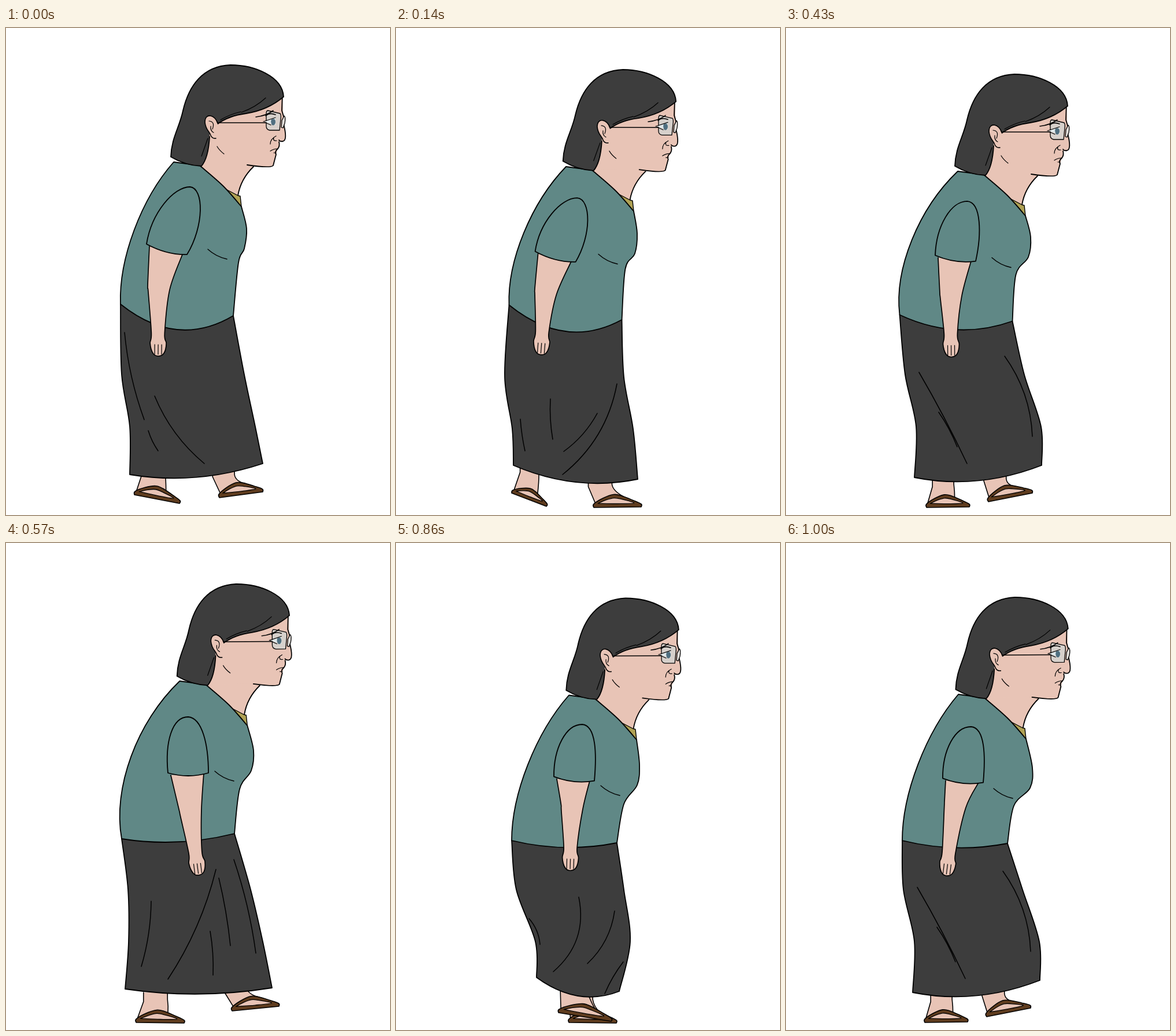
Animation, 664 px wide and 843 px high, one loop 1140 ms. Source, as an HTML page with a canvas:

```html
<!DOCTYPE html>
<html lang="en">
<head>
<meta charset="utf-8">
<title>Walk cycle</title>
<style>
html, body { margin: 0; width: 100%; height: 100%; overflow: hidden; background: #fff; }
canvas { display: block; }
</style>
</head>
<body>
<canvas id="stage" width="664" height="843"></canvas>
<script>
const ctx = document.getElementById('stage').getContext('2d');
const SKIN = '#e8c4b6', CLOTH = '#608886', DARK = '#3d3d3d', BROWN = '#5f3c1e', COLLAR = '#b0a254';
const LOOP = 1140;
const STARTS = [0, 140, 290, 430, 570, 710, 860, 1000];

/* The rig of one pose:
   head  x, y, tilt            hem    shirt corners, left and right
   front waist and bust        hunch  extra bend of the back
   arm   shoulder, cuff, elbow, fingertip
   side  skirt edges: left at KNEE and SHIN, right at KNEE and SHIN
   edge  skirt corners         feet   heel and toe, far foot first
   folds start, end, bow */
const KNEE = 600, SHIN = 690;
const contactA = {
  head: [0, 0, 0], hunch: 3, hem: [198, 478, 393, 498], front: [402, 406, 412, 382],
  arm: [318, 275, 278, 383, 264, 453, 263, 568],
  side: [200, 214, 412, 431], edge: [214, 773, 444, 754],
  feet: [[222, 808, 300, 823], [369, 813, 444, 803]],
  folds: [[205, 527, 239, 678, 10], [246, 697, 263, 732, 3], [257, 637, 343, 754, 18]]
};
const passA = {
  head: [4, 14.5, .008], hunch: 3, hem: [193, 481, 388, 512], front: [391, 428, 414, 399],
  arm: [312, 299, 275, 399, 257, 462, 247, 565],
  side: [218, 240, 388, 401], edge: [220, 773, 406, 760],
  feet: [[279, 792, 315, 803], [303, 829, 391, 829]],
  folds: [[350, 565, 391, 725, -22], [232, 650, 256, 739, 0], [259, 745, 262, 770, -2]]
};
const contactB = {
  head: [10.3, 7, -.006], hunch: 16, hem: [200, 512, 395, 503], front: [404, 426, 424, 394],
  arm: [315, 301, 315, 398, 319, 467, 333, 575],
  side: [211, 212, 423, 444], edge: [206, 772, 460, 770],
  feet: [[391, 810, 472, 802], [225, 830, 308, 831]],
  folds: [[363, 565, 280, 755, -18], [368, 580, 388, 697, -4], [394, 548, 432, 710, -8],
    [251, 620, 234, 733, -8], [353, 672, 358, 748, -4]]
};
const downB = {
  head: [7, 20, -.014], hunch: 0, hem: [196, 507, 392, 511], front: [400, 440, 420, 411],
  arm: [320, 309, 323, 407, 331, 467, 366, 554],
  side: [202, 215, 408, 424], edge: [217, 753, 432, 777],
  feet: [[214, 801, 274, 824], [356, 826, 438, 825]],
  folds: [[281, 638, 285, 708, 4], [396, 612, 302, 769, -34], [229, 673, 237, 728, 2], [362, 663, 304, 729, -10]]
};
const passB = {
  head: [9, 31.5, -.004], hunch: 0, hem: [200, 515, 382, 519], front: [394, 452, 417, 419],
  arm: [322, 314, 308, 408, 304, 460, 301, 567],
  side: [208, 241, 394, 405], edge: [243, 752, 386, 776],
  feet: [[299, 830, 381, 831], [281, 813, 372, 828]],
  folds: [[316, 613, 272, 742, -40], [378, 637, 331, 728, -18], [393, 725, 361, 780, 4], [230, 650, 249, 695, -8]]
};
const upB = {
  head: [8, 30, -.006], hunch: 0, hem: [201, 515, 383, 520], front: [394, 455, 422, 424],
  arm: [320, 318, 306, 411, 292, 456, 277, 576],
  side: [203, 222, 409, 438], edge: [219, 778, 439, 757],
  feet: [[347, 820, 423, 805], [240, 830, 314, 829]],
  folds: [[227, 596, 310, 754, -4], [261, 665, 293, 725, -4], [375, 568, 423, 707, -22]]
};

const lerp = (a, b, t) => a + (b - a) * t;
const mix = (a, b, t) => a.map((v, i) => lerp(v, b[i], t));

// Body between two poses, legs as half a cycle later and moved sideways.
function between(a, b, armT, legs, shift) {
  const p = { ...legs, shift, hunch: lerp(a.hunch, b.hunch, .5), arm: mix(a.arm, b.arm, armT) };
  for (const k of ['head', 'hem', 'front']) p[k] = mix(a[k], b[k], .5);
  return p;
}
const downA = between(contactA, passA, .8, downB, [-14, 4]);
const upA = between(passA, contactB, .45, upB, [3, 0]);
downA.head = [4, 8, .004];
upA.head = [7, 16, 0];

const poses = [contactA, downA, passA, upA, contactB, downB, passB, upB];

function paint(fill, width, path) {
  const args = path ? [path] : [];
  if (fill) { ctx.fillStyle = fill; ctx.fill(...args); }
  if (width) { ctx.lineWidth = width; ctx.stroke(...args); }
}

// Smooth curve through points, going on from the current point of the path.
function spline(pts) {
  const at = i => pts[Math.max(0, Math.min(pts.length - 1, i))];
  ctx.lineTo(...pts[0]);
  for (let i = 0; i < pts.length - 1; i++) {
    const [a, b, c, d] = [-1, 0, 1, 2].map(k => at(i + k));
    ctx.bezierCurveTo(b[0] + (c[0] - a[0]) / 6, b[1] + (c[1] - a[1]) / 6,
      c[0] - (d[0] - b[0]) / 6, c[1] - (d[1] - b[1]) / 6, ...c);
  }
}

function sagTo(x0, y0, x1, y1, sag) {
  ctx.quadraticCurveTo((x0 + x1) / 2, (y0 + y1) / 2 + sag * 2, x1, y1);
}

function bowed([x0, y0, x1, y1, bow], width = 1.4) {
  const len = Math.hypot(x1 - x0, y1 - y0);
  ctx.beginPath();
  ctx.moveTo(x0, y0);
  ctx.quadraticCurveTo((x0 + x1) / 2 - (y1 - y0) / len * bow, (y0 + y1) / 2 + (x1 - x0) / len * bow, x1, y1);
  paint(null, width);
}

function foot([hx, hy, tx, ty]) {
  const dx = tx - hx, dy = ty - hy, len = Math.hypot(dx, dy), s = Math.min(1, len / 75) / len;
  // u runs from heel to toe, v rises from the sole
  const at = ([u, v]) => [hx + dx * u + dy * v * s, hy + dy * u - dx * v * s];
  const lean = hx + (300 - hx) * .17, top = hy - 52;
  const instep = at([.66, 17]);
  ctx.beginPath();
  ctx.moveTo(lean, top);
  ctx.lineTo(lean, hy - 36);
  ctx.lineTo(...at([.03, 8]));
  ctx.lineTo(...at([.66, 5]));
  ctx.lineTo(...instep);
  ctx.quadraticCurveTo(lean + len * .52, hy - 28, lean + len * .5, hy - 40);
  ctx.lineTo(lean + len * .5, top);
  paint(SKIN, 1.6);
  ctx.beginPath();
  spline([[0, 0], [0, 6], [.2, 16], [.42, 22], [.58, 20], [.82, 12], [1, 5], [1, 0]].map(at));
  ctx.closePath();
  paint(BROWN, 1.6);
  ctx.beginPath();
  spline([[.09, 7], [.27, 13], [.43, 16], [.58, 14], [.85, 7], [.5, 6], [.09, 7]].map(at));
  paint(SKIN, 1.3);
}

function legs(p) {
  const [sx, sy] = p.shift || [0, 0];
  const [lx, ly, rx, ry] = p.hem;
  const [lk, ls, rk, rs] = p.side, [ax, ay, bx, by] = p.edge;
  ctx.save();
  ctx.translate(sx, sy);
  p.feet.forEach(foot);
  ctx.beginPath();
  spline([[lx - sx, ly - sy], [lk, KNEE], [ls, SHIN], [ax, ay]]);
  sagTo(ax, ay, bx, by, Math.min(20, 58 - .19 * (bx - ax)));
  spline([[bx, by], [rs, SHIN], [rk, KNEE], [rx - sx, ry - sy]]);
  ctx.closePath();
  paint(DARK, 1.8);
  p.folds.forEach(f => bowed(f, 1.5));
  ctx.restore();
}

function shirt(p) {
  const [hx, hy] = p.head, [lx, ly, rx, ry] = p.hem, [wx, wy, ux, uy] = p.front;
  const nx = 290 + hx, ny = 232 + hy, dx = lx - nx, dy = ly - ny;
  const throat = [407 + hx, 309 + hy];
  ctx.beginPath();
  [[380, 279], [401, 290], [405, 291]].forEach(([x, y]) => ctx.lineTo(x + hx, y + hy));
  ctx.lineTo(...throat);
  paint(COLLAR, 1.4);
  ctx.beginPath();
  ctx.moveTo(nx, ny);
  ctx.bezierCurveTo(nx + dx * .58 - p.hunch, ny + dy * .26, nx + dx - p.hunch, ny + dy * .68, lx, ly);
  sagTo(lx, ly, rx, ry, 10 + Math.max(0, 510 - ly) * .75);
  spline([[rx, ry], [wx, wy], [ux, uy], [ux + 4, uy - 35], throat]);
  spline([throat, [375 + hx, 273 + hy], [335 + hx, 238 + hy]]);
  ctx.closePath();
  paint(CLOTH, 1.8);
  bowed([ux - 63, uy + 1, ux - 30, uy + 18, 5]);
}

function arm([tx, ty, cx, cy, mx, my, hx, hy]) {
  const len = Math.hypot(hx - mx, hy - my), dx = (hx - mx) / len, dy = (hy - my) / len;
  // along runs down the forearm, out runs across it
  const from = (x, y) => (along, out) => [x + dx * along + dy * out, y + dy * along - dx * out];
  const elbow = from(mx, my), tip = from(hx, hy);
  const half = 35, tilt = -.7 * half * (cx - tx) / (cy - ty);
  const ax = cx - half, ay = cy - tilt, bx = cx + half, by = cy + tilt;

  ctx.beginPath();
  spline([[ax + 5, ay + 4], elbow(-8, -19), elbow(4, -18), tip(-40, -12), tip(-22, -14), tip(-5, -9),
    tip(0, 0), tip(-5, 10), tip(-22, 14), tip(-40, 11), elbow(0, 19), [bx - 8, by]]);
  paint(SKIN, 1.7);
  for (const k of [-6, 0, 6]) bowed([...tip(-20, k), ...tip(-3, k), 0], 1.2);

  const h = ay - ty, w = bx - ax;
  ctx.beginPath();
  ctx.moveTo(ax, ay);
  ctx.bezierCurveTo(ax + (tx - ax - 50) * .35, ay - h * .55, tx - w * .4, ty, tx, ty);
  ctx.bezierCurveTo(tx + w * .35, ty + 2, bx + Math.max(0, 25 - bx + tx), by - h * .5, bx, by);
  sagTo(bx, by, ax, ay, 5);
  ctx.closePath();
  paint(CLOTH, 1.8);
}

function inHead([x, y, tilt], draw) {
  ctx.save();
  ctx.translate(385 + x, 155 + y);
  ctx.rotate(tilt);
  ctx.translate(-385, -155);
  draw();
  ctx.restore();
}

const draw = (d, fill, width) => paint(fill, width, new Path2D(d));

function neck() {
  const throat = 'M428 240Q406 261 401 290';
  draw(throat + 'L380 310L330 260V200H430Z', SKIN);
  draw(throat, null, 1.8);
}

function head() {
  // face
  const profile = 'M478 112L477 143L480 153V166Q487 194 479 196Q474 197 472 194'
    + 'M472 197Q474 204 470 209Q464 214 467 219L462 238Q458 243 417 237';
  draw('M478 112L480 166Q487 194 479 196L472 197Q474 204 470 209L467 219L462 238Q458 243 417 237H350V160Z', SKIN);
  draw(profile, null, 1.8);
  draw('M365 205Q369 212 377 218M457 213Q463 209 470 209M463 216H467M467 187Q457 192 457 201M463 190Q461 196 468 195', null, 1.2);

  // hair
  const crown = 'M480 119C478 84 430 64 388 64C340 66 316 100 306 143C300 172 286 190 285 223Q310 238 338 239Q350 225 352 188';
  const fringe = 'Q453 142 415 148Q385 152 366 166';
  draw(crown + 'V160L366 166Q385 152 415 148Q453 142 480 119Z', DARK);
  draw(crown + 'M480 119' + fringe, null, 1.8);
  draw('M371 159Q388 149 406 145M407 146Q432 137 449 121M338 222L349 191', null, 1.2);

  // ear
  draw('M366 165C362 150 344 146 344 163C345 177 353 180 354 186Q357 192 363 191', SKIN, 1.6);
  draw('M351 161Q362 162 357 175M354 170Q353 178 359 181', null, 1.2);

  // glasses and eye
  draw('M366 164H450', null, 1.5);
  draw('M453 143L474 148Q476 150 475 158L473 177L456 177Q450 176 450 170V148Q450 143 453 143Z', '#d6d0cb', 1.3);
  draw('M476 172L477 160L481 152Q484 154 482 165L479 173Z', '#e2deda', 1.3);
  draw('M447 162L466 156V168Z', '#dfe8ea');
  draw('M459 158Q466 155 466 163Q465 170 460 168Q457 163 459 158Z', '#4f6f80');
  draw('M445 162L466 155M447 163L458 168', null, 1.2);
  draw('M432 154Q450 152 462 143M449 152Q456 146 466 150', null, 1.6);
}

function drawPose(p) {
  ctx.fillStyle = '#fff';
  ctx.fillRect(0, 0, 664, 843);
  ctx.strokeStyle = '#000';
  ctx.lineCap = ctx.lineJoin = 'round';
  legs(p);
  inHead(p.head, neck);
  shirt(p);
  inHead(p.head, head);
  arm(p.arm);
}

const origin = performance.now();
function tick() {
  const t = Math.max(0, performance.now() - origin) % LOOP;
  drawPose(poses[STARTS.filter(s => s <= t).length - 1]);
  requestAnimationFrame(tick);
}
tick();
</script>
</body>
</html>
```
